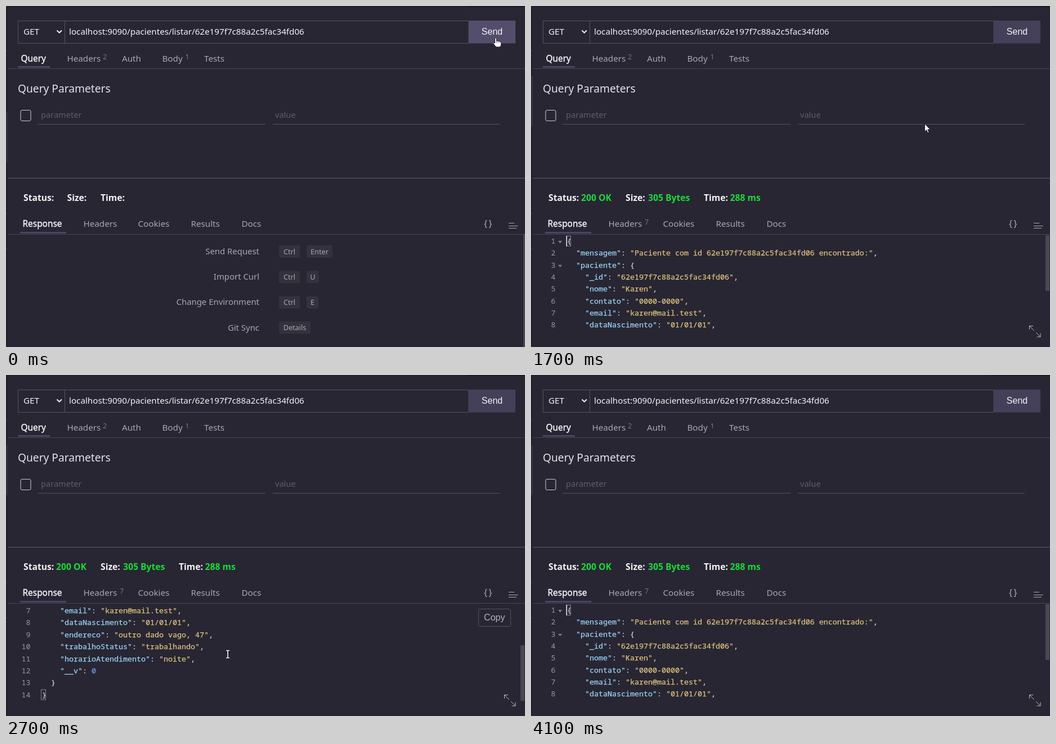
An HTML page that plays this animation: 922x607 px, repeating every 4800 ms.

```html
<!DOCTYPE html>
<html lang="en">
<head>
<meta charset="utf-8">
<title>REST client</title>
<style>
  html, body { margin: 0; width: 100%; height: 100%; overflow: hidden; background: #282633; }
  svg { display: block; width: 100vw; height: 100vh; }
  text { font-family: "Noto Sans", "Open Sans", sans-serif; font-size: 15.2px; white-space: pre; }
  .btn { font-family: "Liberation Sans", Arial, sans-serif; font-size: 16px; }
  .code text { font-family: "Noto Sans Mono", "DejaVu Sans Mono", monospace; font-size: 13.333px; }
  .code tspan { stroke-width: 0.25px; }
  .status text { font-size: 15.7px; font-weight: 600; }
  .active { font-size: 15.4px; stroke: #f4f3f6; stroke-width: 0.4px; }
</style>
</head>
<body>
<svg id="stage" viewBox="0 0 922 607">
  <defs>
    <clipPath id="pane"><rect x="4" y="407.5" width="910" height="173"/></clipPath>
  </defs>
</svg>
<script>
const LOOP = 4800, STEP = 100;
const WHITE = '#f4f3f6', GREY = '#a9a8b0', LINE = '#555360', BG = '#282633', GREEN = '#17dc38';
const KEY = '#9bd5f7', STR = '#dec47c', NUM = '#6c9fee', PUNCT = '#d9d8de';
const stage = document.getElementById('stage');

function add(parent, tag, attrs, content) {
  const node = document.createElementNS('http://www.w3.org/2000/svg', tag);
  for (const k in attrs) node.setAttribute(k, attrs[k]);
  if (content !== undefined) node.textContent = content;
  parent.appendChild(node);
  return node;
}
const group = (attrs = {}, parent = stage) => add(parent, 'g', attrs);
const rect = (p, x, y, width, height, fill, more) => add(p, 'rect', { x, y, width, height, fill, ...more });
const label = (p, x, y, str, fill, style = '', more) => add(p, 'text', { x, y, fill, style, ...more }, str);
const stroke = (p, d, color, width = 1, more) =>
  add(p, 'path', { d, fill: 'none', stroke: color, 'stroke-width': width, ...more });
const show = (node, on) => node.setAttribute('display', on ? 'inline' : 'none');

// Window edges
const base = group();
rect(base, 0, 0, 922, 607, BG);
rect(base, 0, 0, 3, 607, '#23212c');
rect(base, 0, 0, 922, 2, '#22202b');
rect(base, 817, 0, 105, 2, '#191821');
stroke(base, 'M0 79.5H3M0 369.5H3M0 432.5H3', '#3c3a46');
const sideItem = rect(base, 0, 188, 3, 90, '#32303d');

// Request bar
stroke(base, 'M21.5 26.5H822V66.5H21.5ZM104.5 26.5V66.5', LINE);
label(base, 31, 51, 'GET', WHITE);
stroke(base, 'M90.5 43.5L94.7 47.7L98.9 43.5', WHITE, 2);
label(base, 112, 51, 'localhost:9090/pacientes/listar/62e197f7c88a2c5fac34fd06', WHITE);
const send = rect(base, 822, 26, 83, 40.5, '#544e6c');
const sendText = label(base, 863.5, 50.5, 'Send', WHITE, '', { class: 'btn', 'text-anchor': 'middle' });

// Request tabs
label(base, 26.5, 98.5, 'Query', WHITE, '', { class: 'active' });
[[108.5, 'Headers'], [206, 'Auth'], [277.5, 'Body'], [352, 'Tests']].forEach(([x, s]) => label(base, x, 98.5, s, GREY));
const count = (x, y, s) => label(base, x, y, s, '#77728f', 'font-size:12.5px');
count(172, 95, '2');
count(318.5, 95, '1');
rect(base, 21, 107, 57, 3, '#4a4565');
stroke(base, 'M3 111.5H922', '#484653');

label(base, 21, 154, 'Query Parameters', '#e4e3e8', 'font-size:19.2px;font-weight:300');
rect(base, 26, 185.5, 18, 19, 'none', { stroke: '#cfced4', rx: 2.5 });
stroke(base, 'M56 210.5H461M474 210.5H877', LINE);
label(base, 62, 199, 'parameter', '#5f5d69', 'font-size:14.6px');
label(base, 478, 199, 'value', '#5f5d69', 'font-size:14.6px');
stroke(base, 'M3 306.5H922', '#5d5b67');

// Status line, one group per phase
const idle = group({ class: 'status' });
[[31, 'Status:'], [108.5, 'Size:'], [168, 'Time:']].forEach(([x, s]) => label(idle, x, 347, s, WHITE));
const busy = group({ class: 'status' });
label(busy, 31, 347, 'Processing, Please Wait...', WHITE);
const done = group({ class: 'status' });
[[31, 'Status:', 89, '200 OK'], [168, 'Size:', 208, '305 Bytes'], [307, 'Time:', 353.5, '288 ms']]
  .forEach(([x, s, vx, v]) => {
    label(done, x, 347, s, WHITE);
    label(done, vx, 347, v, GREEN);
  });

// Response tabs
label(base, 29.5, 392.5, 'Response', WHITE, '', { class: 'active' });
[[137.5, 'Headers'], [234.5, 'Cookies'], [328.5, 'Results'], [418.5, 'Docs']].forEach(([x, s]) => label(base, x, 392.5, s, GREY));
const headerCount = count(202, 389, '7');
rect(base, 25, 402, 82, 3, '#4a4565');
stroke(base, 'M3 406.5H922', '#484653');
label(base, 849, 393, '{', GREY, 'font-size:16px');
label(base, 857.5, 393, '}', GREY, 'font-size:16px');
stroke(base, 'M893 386.5H903M893 391.5H909.5M893 395.5H907', GREY);

// Shortcuts
const tips = group({}, idle);
[['Send Request', 'Ctrl', 'Enter', 46], ['Import Curl', 'Ctrl', 'U', 22],
 ['Change Environment', 'Ctrl', 'E', 21], ['Git Sync', 'Details']].forEach(([name, a, b, w], i) => {
  const y = 437 + i * 45.2;
  const key = (x, width, s) => {
    rect(tips, x, y - 11, width, 22, '#34323d', { rx: 3 });
    label(tips, x + width / 2, y + 4.5, s, GREY, 'font-size:12.7px;font-weight:400', { 'text-anchor': 'middle' });
  };
  label(tips, 450, y + 5, name, GREY, 'font-size:14.9px;font-weight:400', { 'text-anchor': 'end' });
  key(485, b ? 37 : 56, a);
  if (b) key(534, w, b);
});
rect(tips, 919, 407, 3, 200, '#4a4852');

// Processing panel
const mid = { 'text-anchor': 'middle' };
add(busy, 'circle', { cx: 462, cy: 444, r: 18, fill: 'none', stroke: '#403e4b', 'stroke-width': 3.6 });
const arc = stroke(busy, 'M449.3 431.3A18 18 0 0 1 474.7 431.3', '#464158', 3.6);
label(busy, 462, 490, 'Processing...', '#85838d', 'font-size:14.7px;font-weight:400', mid);
label(busy, 462, 544.5, 'Cancel Request', '#75737d', 'font-size:15.5px;font-weight:400', { ...mid, class: 'btn' });

// Response body
const viewer = group();
const code = group({ class: 'code' }, group({ 'clip-path': 'url(#pane)' }, viewer));
const PITCH = 21.35;
const rows = [
  '{',
  '  "mensagem": "Paciente com id 62e197f7c88a2c5fac34fd06 encontrado:",',
  '  "paciente": {',
  '    "_id": "62e197f7c88a2c5fac34fd06",',
  '    "nome": "Karen",',
  '    "contato": "0000-0000",',
  '    "email": "karen@mail.test",',
  '    "dataNascimento": "01/01/01",',
  '    "endereco": "outro dado vago, 47",',
  '    "trabalhoStatus": "trabalhando",',
  '    "horarioAtendimento": "noite",',
  '    "__v": 0',
  '  }',
  '}'
];
rows.forEach((row, i) => {
  const y = 423 + i * PITCH, ends = i === 0 || i === rows.length - 1;
  label(code, 43.5, y, i + 1, '#9a98a3', '', { 'text-anchor': 'end' });
  if (i === 0 || i === 2) add(code, 'path', { d: `M48 ${y - 5}H55.4L51.7 ${y - 0.6}Z`, fill: '#7d7b87' });
  if (ends) rect(code, 62.5, y - 13.5, 8, 18, 'none', { stroke: '#85838d' });
  const indent = row.search(/\S/);
  const line = label(code, 64 + indent * 8, y, '', PUNCT);
  for (const part of row.trim().match(/"[^"]*"(?=:)|"[^"]*"|\d+|[^"\d]+/g)) {
    const isKey = row.includes(part + ':');
    const fill = part[0] === '"' ? (isKey ? KEY : STR) : /\d/.test(part) ? NUM : PUNCT;
    add(line, 'tspan', { fill, stroke: fill }, part);
  }
});
stroke(code, 'M63.5 409V427.5', '#e6e5ea', 1.2);
const thumb = rect(viewer, 914, 408, 7, 99, '#4a4853');
stroke(viewer, 'M885.5 576V569.5H892M885.5 569.5L894 578M897 581L905 589M898.5 589H905V582.5', '#b9b8bf');

const copy = group({}, viewer);
rect(copy, 839.5, 416.5, 57, 31, BG, { rx: 3, stroke: LINE });
label(copy, 867.8, 437, 'Copy', '#b4b3ba', '', { class: 'btn', 'text-anchor': 'middle' });

// Pointer shapes, centred on 0,0
const pointer = group();
const shapes = { hand: group({}, pointer), arrow: group({}, pointer), beam: group({}, pointer) };
const solid = (p, d) => add(p, 'path', { d, fill: '#fff', stroke: '#15141b', 'stroke-width': 1, 'stroke-linejoin': 'round' });
solid(shapes.hand, 'M-4.5 -7Q-3 -9.5 -1.5 -7V-2.5Q0 -4 1.4 -2.2Q3 -3.4 4.2 -1.6Q6.5 -2.4 6.8 0V4L5 8H-2.5L-7.3 1.8Q-7.8 -.8 -4.5 1Z');
stroke(shapes.hand, 'M-1.5 -2.5V1M1.4 -2V1M4.2 -1.4V1', '#55535f', 0.8);
solid(shapes.arrow, 'M-5 -8V6L-1.8 3L.4 8L2.6 7L.5 2.2H5Z');
const beam = 'M-3 -6.5H3M-3 6.5H3M0 -6.5V6.5';
stroke(shapes.beam, beam, '#15141b', 3.4);
stroke(shapes.beam, beam, '#fff', 1.6);

// [time, x, y] of the pointer
const path = [
  [0, 873, 65], [1400, 873, 65], [1500, 873, 66], [2000, 394, 497], [3100, 394, 497],
  [3300, 397, 481], [3700, 397, 481], [4000, 172, 54], [LOOP, 172, 54]
];
function pointerAt(t) {
  const i = path.findIndex(p => p[0] > t);
  const [t0, x0, y0] = path[i - 1], [t1, x1, y1] = path[i];
  const u = (t - t0) / (t1 - t0), e = u * u * (3 - 2 * u);
  return [x0 + (x1 - x0) * e, y0 + (y1 - y0) * e];
}

function draw(ms) {
  const t = Math.floor((ms % LOOP) / STEP) * STEP;
  const phase = t < 900 ? idle : t < 1200 ? busy : done;
  [idle, busy, done].forEach(g => show(g, g === phase));
  show(viewer, phase === done);
  show(headerCount, phase === done);
  sideItem.setAttribute('y', phase === done ? 124 : 188);
  arc.setAttribute('transform', `rotate(${(t - 900) * 0.36} 462 444)`);

  const [x, y] = pointerAt(t);
  const overSend = x > 822 && x < 905 && y < 68;
  send.setAttribute('fill', phase === busy ? '#b5b4b4' : overSend ? '#544e6c' : '#454059');
  sendText.setAttribute('fill', phase === busy ? '#e9e9e9' : WHITE);
  show(copy, y > 407 && t < 4100);

  const scroll = t < 2400 || t >= 3500 ? 0 : t < 2700 ? 64 : 127;
  code.setAttribute('transform', `translate(0 ${-scroll})`);
  thumb.setAttribute('y', 408 + scroll * 73 / 127);

  const shape = overSend ? 'hand' : y > 407 || y < 67 ? 'beam' : 'arrow';
  for (const k in shapes) show(shapes[k], k === shape);
  show(pointer, t < 4100);
  pointer.setAttribute('transform', `translate(${x} ${y})`);
}

const start = performance.now();
function tick() {
  draw(performance.now() - start);
  requestAnimationFrame(tick);
}
tick();
</script>
</body>
</html>
```
